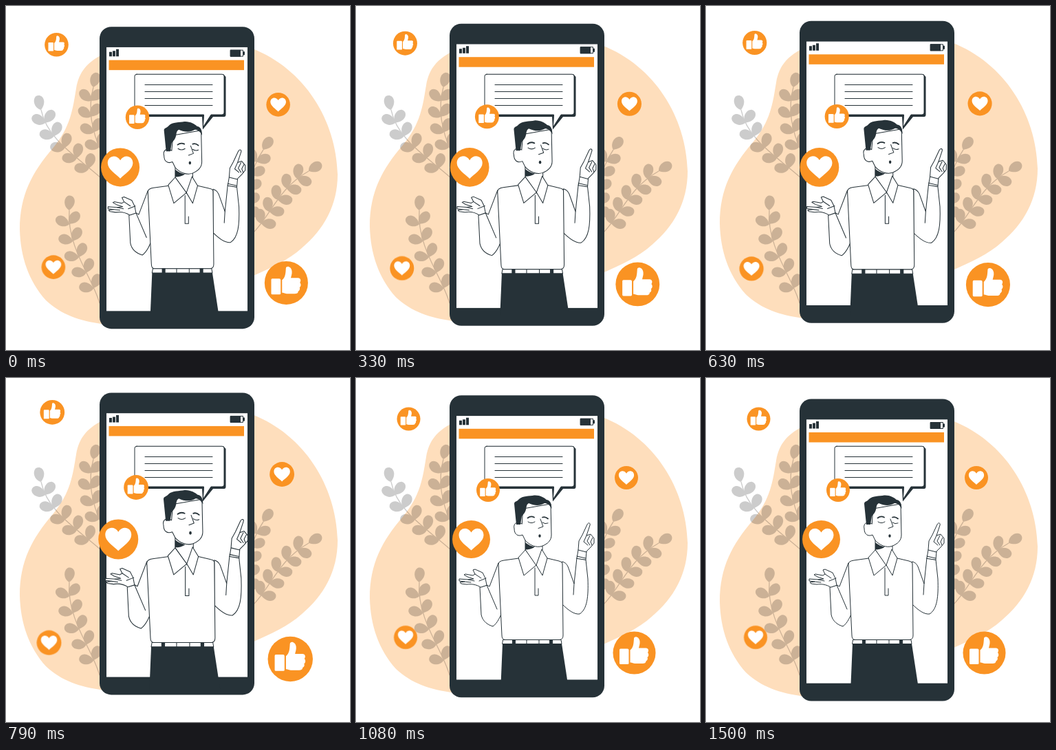
Animation, 500 px wide and 500 px high, one loop 1540 ms. Source, as an HTML page:

```html
<!DOCTYPE html>
<html lang="en">
<head>
<meta charset="utf-8">
<title>Live talk</title>
<style>
  @property --tick { syntax: "<number>"; inherits: true; initial-value: 0; }
  html, body { margin: 0; width: 100%; height: 100%; overflow: hidden; background: #fff; }
  svg {
    display: block; width: 100%; height: 100%;
    --ms: (var(--tick) * 41.62 + 27);
    animation: tick 1540ms steps(37) -4ms infinite;
  }
  @keyframes tick { from { --tick: 0; } to { --tick: 37; } }

  /* up 10px and back over 1500ms */
  .float { transform: translateY(calc(max(0, min(var(--ms), 1500 - var(--ms))) / -75 * 1px)); }

  /* two beats: 0-150-450ms and 600-750-900ms */
  .beat {
    transform: scale(calc(1 + .1 * max(0,
      min(var(--ms) / 150, (450 - var(--ms)) / 300),
      min((var(--ms) - 600) / 150, (900 - var(--ms)) / 150))));
  }
  .man { transform-origin: 248.5px 307px; }
  .icons { transform-origin: 245px 236.5px; }

  .dark { fill: #263238; }
  .orange { fill: #fa9323; }
  .line { fill: #fff; stroke: #263238; stroke-width: 1; stroke-linejoin: round; stroke-linecap: round; }
  .open { fill: none; }
  .brow { stroke-width: 1.8; }
</style>
</head>
<body>
<svg viewBox="0 0 500 500">
  <defs>
    <g id="heart">
      <circle class="orange" r="27.5"/>
      <path fill="#fff" d="M0 16C-6 10-18 3-18-6C-18-17-5-19 0-10C5-19 18-17 18-6C18 3 6 10 0 16Z"/>
    </g>
    <g id="thumb">
      <circle class="orange" r="31"/>
      <path fill="#fff" d="M-20-6H-10Q-8-6-8-4V15Q-8 16.500-9.500 16.500H-20Q-21.500 16.500-21.500 15V-4.500Q-21.500-6-20-6Z
        M-6-4C-1-8-1-14-.5-21C0-25 7-24 8-17C8.500-13 7-10 6.500-7H17C20.500-7 21.500-3 19.500-.5C21.500 2 21 5 19 6.500C20 9 19 11 17 12C17 14.500 15 15.500 12 15.500H2C-2 15.500-3 14-6 14Z"/>
    </g>
  </defs>

  <path class="float" fill="#fedebc" d="M140 71C118 82 106 96 102 120C97 150 94 176 68 207C38 242 20 275 20 325C21 365 33 400 58 428C80 449 108 458 140 462.500L300 420L358 393C385 381 410 370 430 352C462 325 482 290 482 245C480 166 434 92 358 62L250 55Z"/>

  <g id="plants" opacity=".2"></g>

  <g class="float">
    <rect class="dark" x="136" y="30.500" width="225" height="439" rx="17"/>
    <rect fill="#fff" x="146" y="60.300" width="205" height="383.400"/>
    <rect class="orange" x="149.500" y="79" width="196.500" height="14.500"/>
    <path class="dark" d="M150 67h4v6.500h-4ZM155 65.500h4v8h-4ZM160 63h4v10.500h-4Z"/>
    <rect class="line" x="326.500" y="64.500" width="18" height="9"/>
    <path class="dark" d="M326 64h15v10h-15ZM345 66.500h2v5h-2Z"/>
  </g>

  <path class="dark" d="M190 99H316L319.500 103V158Q319.500 161 317 161H301L286 179.500L285 161H190Q187 161 187 158Z"/>
  <path class="line" d="M190 99.200H314Q317 99.200 317 102V155Q317 158 314 158H298L286.500 176L287.500 158H190Q187 158 187 155V102Q187 99.200 190 99.200Z"/>
  <path class="line" d="M202 114.500H300M202 124.500H300M202 134.500H300M202 144.500H300"/>

  <g class="beat man">
    <!-- arms -->
    <path class="line" d="M207 269L194 303L190 301L180 304L182 344C184 354 192 359 199 361C206 356 210 346 214 336Z"/>
    <path class="line open" d="M190 301L205 336"/>
    <path class="line" d="M300 267C304 268 306 270 308 274L317 299L321 261L334 264L337 292C338 318 336 336 325 343C317 344 308 337 300 329Z"/>
    <path class="line open" d="M317 299L316 315"/>
    <!-- hands -->
    <path class="line" d="M181 304C175 300 167 299 161 300L153 299L151 297L158 296L150 295L150 292L163 293L171 292L162 289L157 286L159 285L170 287L173 285L170 279L173 278L184 283L188 291L190 301Z"/>
    <path class="line open" d="M173 285L182 291M163 293L172 295M158 296L167 297M179 295L189 291"/>
    <path class="line" d="M321 262L323 250L324 237L329 228L336 213C338 209 341 211 340 214L335 229L341 227L346 233V240L341 246L335 252L334 264Z"/>
    <path class="line open" d="M335 229L331 238L337 243M340 229L336 237L340 243M344 232L341 238L343 243M323 250L335 253M321 259L334 262"/>
    <!-- shirt -->
    <path class="line" d="M244 261L215 265Q207 266 207 271L212 374Q212 380.500 217 380.500H296Q301 380 301 374L300 270Q300 267 295 266L274 261Z"/>
    <path class="line" d="M246 228V250L262 273L271 250V238Z"/>
    <path class="dark" d="M246 239Q252 244 260 245.500Q254 249.500 246 249.500Z"/>
    <path class="line" d="M246 250L236 261L244 287L262 272L271 287L278 262L270 249L262 272Z"/>
    <path class="line open" d="M260 276V316H265V306"/>
    <!-- head -->
    <path class="line" d="M243 190L283 183L284 228C284 236 279 241 270 244.500C262 247 252 243 246 236L242 228C235 231 230 227 230 219C228 212 234 207 241 212Z"/>
    <path class="dark" d="M233 213L230 183C230 179 234 180 237 176C242 171 252 172 259 170.500C267 170 274 174 277 177C283 178 284 183 284.500 190C281 184 278 182 274 182C267 186 260 186 251 182C246 185 249 190 245 196L241 201L239 213Z"/>
    <path class="line open brow" d="M249.500 203.500Q254 200 259 202.500M271 202.500Q275 201 279 204.500"/>
    <path class="line open" d="M250 209Q255 212.500 260 209M271 210Q275 213 279 211M268 205L272 216L265 218.500"/>
    <ellipse class="dark" cx="267" cy="229.500" rx="1.700" ry="2.300"/>
    <!-- belt and trousers -->
    <path class="dark" d="M213 386H299L308 445H210.500Z"/>
    <path class="line" d="M214 380.500H298L299 386.500H213ZM248 380.500V386.500M266 380.500V386.500"/>
    <path class="dark" d="M227 380h5v7h-5ZM281 380h5v7h-5Z"/>
  </g>

  <g class="beat icons">
    <use href="#thumb" transform="translate(76.500 59.500) scale(.548)"/>
    <use href="#thumb" transform="translate(192 163) scale(.548)"/>
    <use href="#thumb" transform="translate(404.500 399.500)"/>
    <use href="#heart" transform="translate(393 145) scale(.618)"/>
    <use href="#heart" transform="translate(72 377) scale(.618)"/>
    <use href="#heart" transform="translate(167.500 234.500)"/>
  </g>
</svg>
<script>
  const plants = document.getElementById("plants");

  function add(d, attrs) {
    const path = document.createElementNS("http://www.w3.org/2000/svg", "path");
    path.setAttribute("d", d);
    for (const key in attrs) path.setAttribute(key, attrs[key]);
    return plants.appendChild(path);
  }

  function leaf(x, y, angle) {
    add("M0 0C4-9 17-10 21-3C23 2 19 7 13 7C8 7 4 4 0 0Z", {
      transform: `translate(${x} ${y}) rotate(${angle})`
    });
  }

  // A stem drawn from root to tip, with a pair of leaves every `gap` px below the tip.
  function plant(d, pairs, gap, left, right) {
    const stem = add(d, { fill: "none", stroke: "#000", "stroke-width": 1.3 });
    const end = stem.getTotalLength();
    for (let i = 0; i <= pairs; i++) {
      const at = end - (i ? 20 + (i - 1) * gap : 0);
      const p = stem.getPointAtLength(at), q = stem.getPointAtLength(at - 2);
      const angle = Math.atan2(p.y - q.y, p.x - q.x) * 180 / Math.PI;
      if (!i) { leaf(p.x, p.y, angle); continue; }
      leaf(p.x, p.y, angle - left);
      leaf(p.x, p.y, angle + right);
    }
  }

  plant("M136 432C126 395 88 350 92 297", 5, 25, 60, 45);
  plant("M140 215C128 190 117 155 127 118", 4, 23, 50, 42);
  plant("M138 250C105 220 60 195 51 151", 5, 23, 38, 60);
  plant("M358 331C385 305 395 265 440 240", 5, 21, 43, 56);
  plant("M352 325C349 280 352 240 374 209", 5, 21, 55, 48);
</script>
</body>
</html>
```
